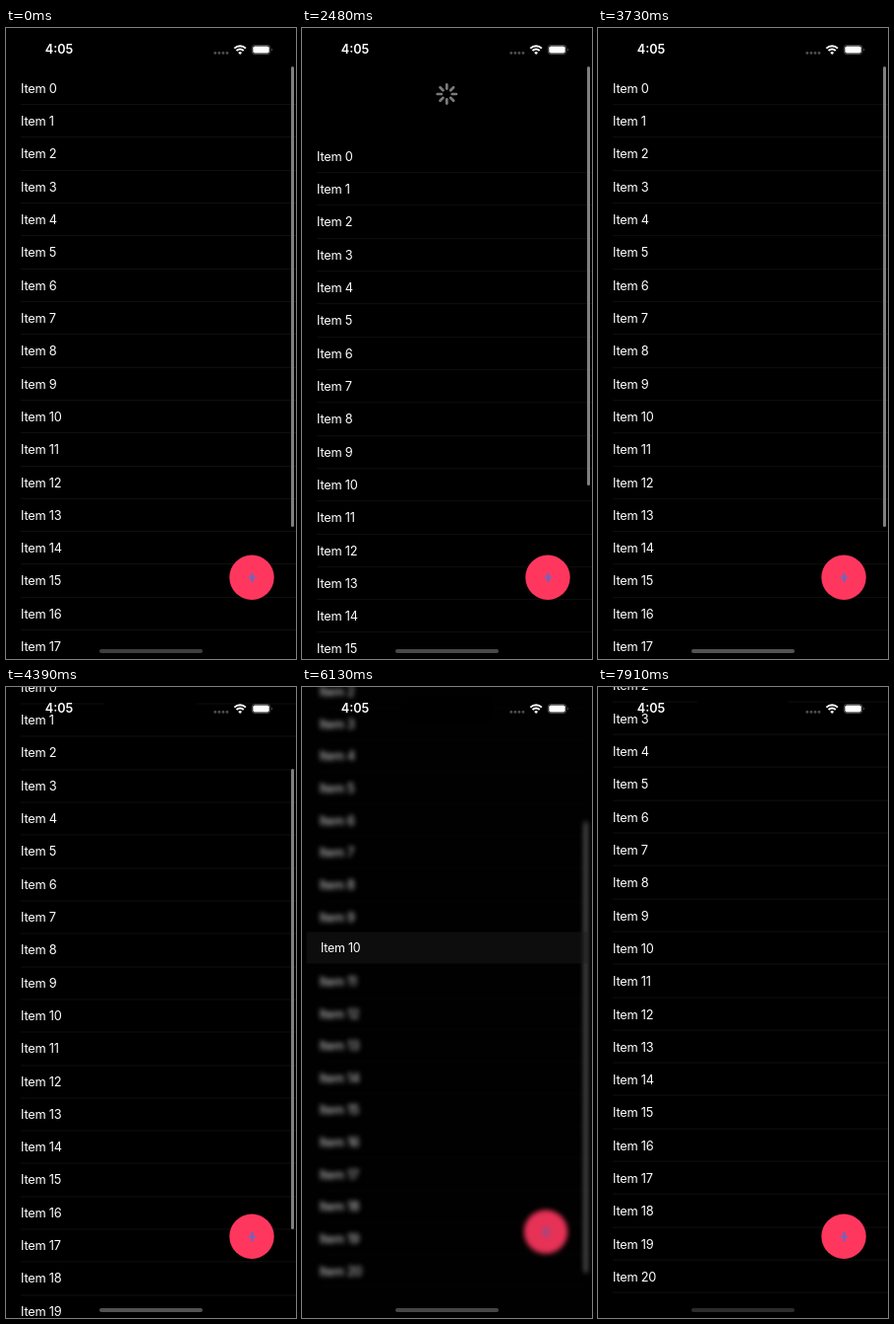
An HTML page that plays this animation: 295 by 640 pixels, repeating every 8 s.

```html
<!DOCTYPE html>
<html lang="en">
<head>
<meta charset="utf-8">
<title>List with pull to refresh</title>
<style>
  html, body { margin: 0; width: 100%; height: 100%; overflow: hidden; background: #000; }
  #stage { position: relative; width: 295px; height: 640px; overflow: hidden; background: #000;
    color: #fff; font: 400 12.8px/33.32px Inter, Roboto, sans-serif; letter-spacing: -.24px; }
  #stage div, #stage svg { position: absolute; }
  #back { inset: 0; transform-origin: 147.5px 320px; }
  #list { left: 0; top: 44.7px; width: 295px; }
  .row { left: 15px; width: 280px; height: 33.32px; white-space: pre; }
  .row::after { content: ""; position: absolute; left: 0; right: 0; bottom: 0; height: 1px; background: #0f0f10; }
  #bar { left: 290px; width: 3px; border-radius: 2px; background: #808080; }
  #fab { left: 227px; top: 534px; }
  #spinner { left: 135px; top: -12px; }
  #veil { inset: 0; background: #0e0e11; }
  #preview { left: 0; top: 248px; width: 280px; height: 33.32px; padding-left: 15px; background: #1c1c1e; }
  #menu { left: 10px; top: 291px; width: 174px; height: 30.5px; border-radius: 8px; background: #1f1f21;
    color: #cfcfd1; font-size: 12px; line-height: 31px; text-indent: 12px; transform-origin: 40px -10px; }
  #island { left: 99px; top: 8px; width: 96px; height: 28px; border-radius: 14px; background: #000; }
  #clock { left: 39.7px; top: 14px; font-weight: 600; font-size: 12.7px; line-height: 16px; letter-spacing: 0; }
  #status { left: 208px; top: 14px; }
  #home { left: 95px; top: 630px; width: 105px; height: 4px; border-radius: 2px; }
</style>
</head>
<body>
<div id="stage">
  <div id="back">
    <div id="list"></div>
    <svg id="spinner" width="24" height="24" viewBox="-12.3 -12 24 24" stroke="#b0b0b0" stroke-width="2.7" stroke-linecap="round"></svg>
    <div id="bar"></div>
    <svg id="fab" width="47" height="47" viewBox="-23 -23.3 47 47">
      <circle r="22.7" fill="#ff375f"/>
      <path d="M-4 .2H4.8" stroke="#6a6cc4" stroke-width="1.4"/>
      <path d="M.4 -4.6V5" stroke="#3f74da" stroke-width="1.8"/>
    </svg>
  </div>
  <div id="veil"></div>
  <div id="preview">Item 10</div>
  <div id="menu">Generic</div>
  <div id="island"></div>
  <div id="clock">4:05</div>
  <svg id="status" width="66" height="18" viewBox="208 14 66 18">
    <path d="M212.8 25.3H226" stroke="#4c4c4c" stroke-width="3" stroke-linecap="round" stroke-dasharray="0 4.05"/>
    <g fill="none" stroke="#fff" stroke-width="1.9">
      <path d="M232.3 20.6A8.2 8.2 0 0 1 243.9 20.6"/>
      <path d="M234.5 23A5 5 0 0 1 241.7 23"/>
    </g>
    <path d="M236.2 24.9A2.7 2.7 0 0 1 240 24.9L238.1 26.9Z" fill="#fff"/>
    <rect x="250.2" y="17.5" width="18.6" height="9" rx="2.8" fill="none" stroke="#5c5c5c" stroke-width=".8"/>
    <rect x="251.3" y="18.5" width="16.4" height="7" rx="1.8" fill="#fff"/>
    <path d="M270 20.4Q271.6 22 270 23.6Z" fill="#777"/>
  </svg>
  <div id="home"></div>
</div>
<script>
const LOOP = 8000, ROW = 33.32, END = 129.4;
const $ = id => document.getElementById(id);
const clamp = (v, a = 0, b = 1) => Math.min(b, Math.max(a, v));

// Smooth 0 to 1 between two times
function ease(t, from, to) {
  const u = clamp((t - from) / (to - from));
  return u * u * (3 - 2 * u);
}

// Active stretches: first change, last change, number of changes
const runs = [[0, 260, 3], [2020, 5180, 29], [5790, 7010, 12], [7240, 7910, 7]];

function snap(t) {
  const [from, to, n] = runs.filter(r => r[0] <= t).pop();
  const gap = (to - from) / (n - 1);
  return from + gap * Math.min(n - 1, Math.floor((t - from) / gap + .02));
}

function listShift(t) {
  const pull = 86 * ease(t, 2020, 2650);
  const release = 40 * ease(t, 2700, 2945);
  const refreshed = 46 * ease(t, 3280, 3730);
  const drag = 20 * ease(t, 3830, 4250);
  const flick = 126 * ease(t, 4187, 4723);
  const bounce = 16.1 * ease(t, 4729, 5180) + .5 * ease(t, 5790, 6010);
  return pull - release - refreshed - drag - flick + bounce;
}

const rows = Array.from({ length: 21 }, (_, i) => {
  const row = document.createElement("div");
  row.className = "row";
  row.textContent = "Item " + i;
  row.style.top = i * ROW + "px";
  return $("list").appendChild(row);
});

const spokes = Array.from({ length: 8 }, (_, i) => {
  const line = document.createElementNS("http://www.w3.org/2000/svg", "path");
  line.setAttribute("d", "M0 -5.4V-9.6");
  line.setAttribute("transform", `rotate(${i * 45})`);
  return $("spinner").appendChild(line);
});

function drawSpinner(t, y) {
  const spinning = t > 2600, size = 1 - ease(t, 3280, 3600);
  $("spinner").style.opacity = y > 3 ? size : 0;
  $("spinner").style.transform = `translateY(${Math.min(22 + y, 67)}px) scale(${size})`;
  const head = Math.floor((t - 2923) / 125 + .02) + 7;
  spokes.forEach((s, i) => {
    const age = (head - i + 32) % 8;
    s.style.opacity = spinning ? .92 - age * .1 : clamp((y - 10) / 7 - i) * .7;
  });
}

function drawBar(t, y) {
  const scroll = clamp(-y, 0, END), over = Math.max(0, -y - END);
  const s = $("bar").style;
  s.top = 39 + scroll * .73 + over * .6 + "px";
  s.height = 467 - Math.max(0, y) * .6 - over * .6 + "px";
  s.opacity = 1 - (t < 2020 ? ease(t, 0, 260) : ease(t, 7150, 7500));
}

function drawMenu(t) {
  const b = ease(t, 5790, 6500) - ease(t, 7150, 7750);
  const m = ease(t, 6200, 6566) - ease(t, 7150, 7450);
  $("back").style.filter = b ? `blur(${6.5 * b}px)` : "none";
  $("back").style.transform = b ? `scale(${1 - .045 * b})` : "none";
  $("veil").style.opacity = .22 * b;
  rows[10].style.visibility = b ? "hidden" : "visible";
  const p = $("preview").style;
  p.visibility = b ? "visible" : "hidden";
  p.backgroundColor = `rgba(28,28,30,${b})`;
  p.transform = `scale(${1 - .068 * b})`;
  $("menu").style.opacity = m;
  $("menu").style.transform = `scale(${.4 + .6 * m})`;
}

function drawHome(t) {
  const g = 62 + 20 * ease(t, 2020, 2900) - 30 * ease(t, 5790, 6566) - 8 * ease(t, 7240, 7910);
  $("home").style.background = `rgb(${g},${g},${g})`;
}

function draw(time) {
  const t = snap(time), y = listShift(t);
  $("list").style.transform = `translateY(${y}px)`;
  drawSpinner(t, y);
  drawBar(t, y);
  drawMenu(t);
  drawHome(t);
}

const start = performance.now();
function tick() {
  draw((performance.now() - start) % LOOP);
  requestAnimationFrame(tick);
}
tick();
</script>
</body>
</html>
```
